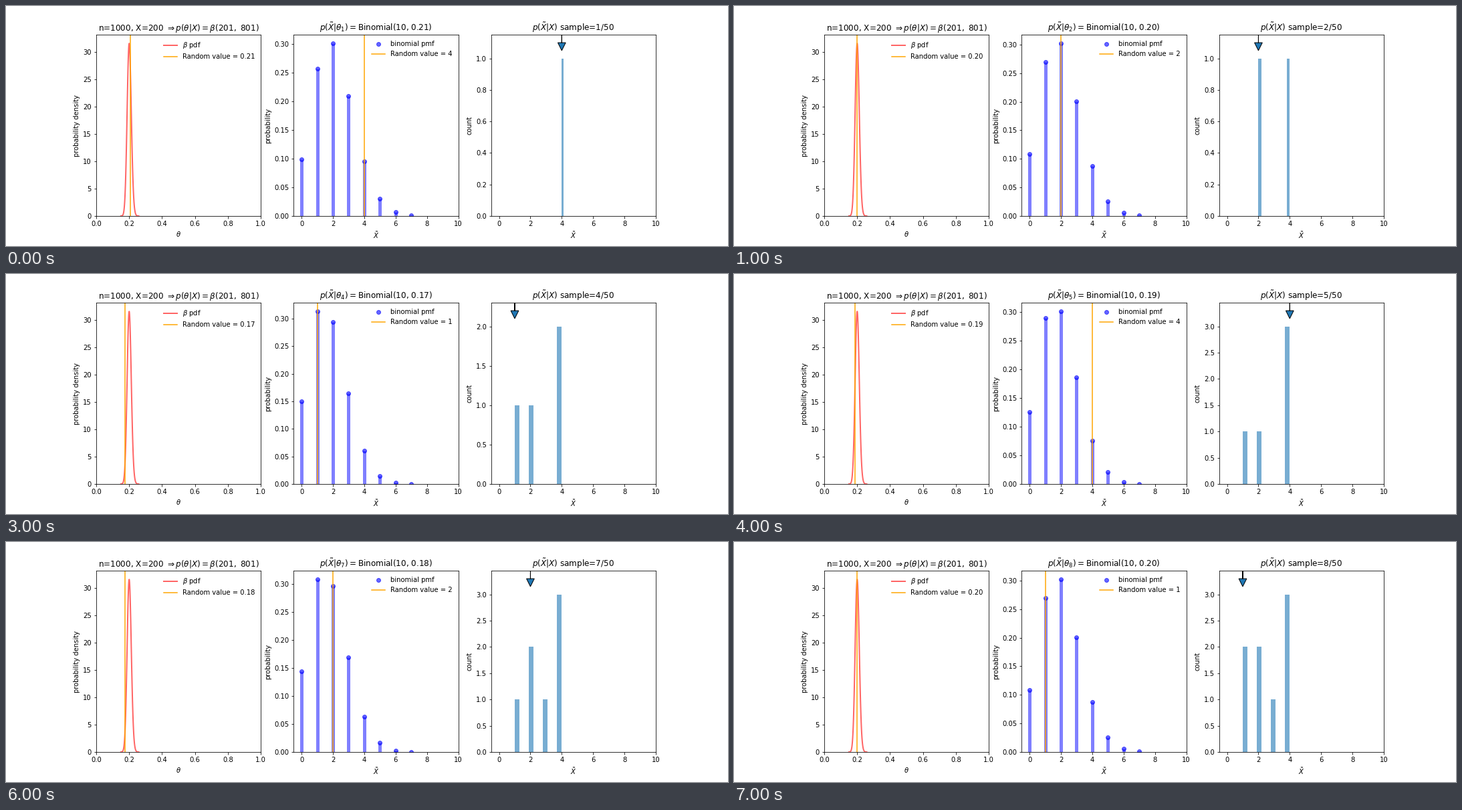
A matplotlib script that plays this animation: 1080 by 360 pixels, repeating every 8 s.

```python
import math

import matplotlib.pyplot as plt
import numpy as np
from matplotlib.animation import FuncAnimation

plt.rcParams.update({
    "font.family": "DejaVu Sans",
    "font.size": 10,
    "figure.dpi": 72,
    "savefig.dpi": 72,
    "figure.subplot.bottom": 0.125,
})

A, B = 201, 801
TRIALS = 10
TOTAL = 50
THETAS = [0.2069, 0.1992, 0.2018, 0.1728, 0.1877, 0.2030, 0.1762, 0.1995]
DRAWS = [4, 2, 4, 1, 4, 3, 2, 1]


def beta_pdf(x):
    log_norm = math.lgamma(A + B) - math.lgamma(A) - math.lgamma(B)
    return np.exp(log_norm + (A - 1) * np.log(x) + (B - 1) * np.log(1 - x))


def binomial_pmf(k, theta):
    return math.comb(TRIALS, k) * theta**k * (1 - theta) ** (TRIALS - k)


def mark_value(ax, value, text):
    ax.axvline(value, color="orange", lw=1.5, label=f"Random value = {text}")
    ax.legend(loc="upper right", frameon=False)


def finish(ax, title, xlabel, ylabel, xlim, top):
    ax.set_title(title)
    ax.set_xlabel(xlabel)
    ax.set_ylabel(ylabel)
    ax.set_xlim(*xlim)
    ax.set_ylim(0, top)


def draw_posterior(ax, theta):
    x = np.linspace(0.150, 0.258, 100)
    density = beta_pdf(x)
    ax.plot(x, density, "r-", lw=2, alpha=0.6, label=r"$\beta$ pdf")
    mark_value(ax, theta, f"{theta:.2f}")
    title = (r"n=1000, X=200 $\Rightarrow p(\theta|X)=\beta(%d,\ %d)$" % (A, B))
    finish(ax, title, r"$\theta$", "probability density",
           (0, 1), density.max() * 1.05)


def draw_likelihood(ax, theta, value, number):
    ks = np.arange(8)
    pmf = [binomial_pmf(int(k), theta) for k in ks]
    ax.plot(ks, pmf, "bo", ms=6, alpha=0.6, label="binomial pmf")
    ax.vlines(ks, 0, pmf, colors="b", lw=5, alpha=0.5)
    mark_value(ax, value, value)
    title = (r"$p(\tilde{X}|\theta_{%d})=$Binomial(%d, %.2f)"
             % (number, TRIALS, theta))
    finish(ax, title, r"$\tilde{X}$", "probability",
           (-0.5, 10), max(pmf) * 1.05)


def draw_predictive(ax, values):
    counts, _, _ = ax.hist(values, bins=10, alpha=0.6)
    peak = counts.max()
    ax.arrow(values[-1], 1.15 * peak, 0, -0.05 * peak,
             head_width=0.5, head_length=0.05 * peak)
    title = r"$p(\tilde{X}|X)$ sample=%d/%d" % (len(values), TOTAL)
    finish(ax, title, r"$\tilde{X}$", "count", (-0.5, 10), 1.15 * peak)


fig, (left, middle, right) = plt.subplots(1, 3, figsize=(15, 5), dpi=72)


def update(i):
    for ax in (left, middle, right):
        ax.clear()
    draw_posterior(left, THETAS[i])
    draw_likelihood(middle, THETAS[i], DRAWS[i], i + 1)
    draw_predictive(right, DRAWS[:i + 1])
    return []


anim = FuncAnimation(fig, update, frames=len(DRAWS), interval=1000,
                     init_func=lambda: [], repeat=True, repeat_delay=0)
plt.show()
```
